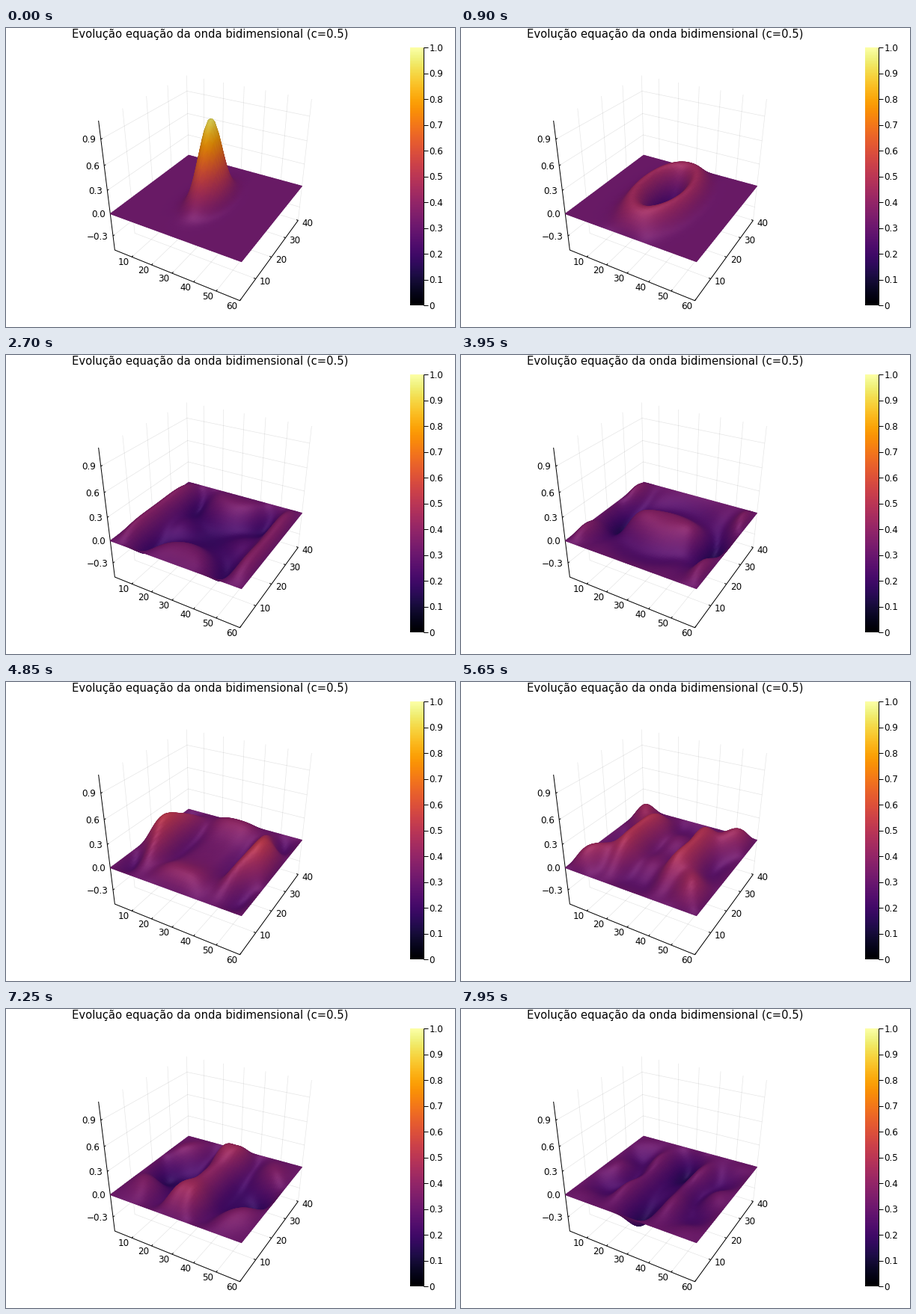
These frames come from a looping animation (600 px wide and 400 px high, 8000 ms). A matplotlib script:

```python
import numpy as np
import matplotlib.pyplot as plt
from matplotlib.animation import FuncAnimation
from matplotlib.collections import LineCollection, TriMesh
from matplotlib.tri import Triangulation

W, H, DPI = 600, 400, 100
FRAMES, INTERVAL = 160, 50
NX, NY = 60, 40
Z_LO, Z_HI = -0.5, 1.1
PX = 72 / DPI                       # points per pixel
LABEL = 11.85                       # tick label size in pixels

plt.rcParams["font.family"] = "DejaVu Sans"
inferno = plt.get_cmap("inferno")

# Camera looking at the cube [-1, 1]^3
VIEW = np.array([0.4330, -0.75, 0.5])
RIGHT = np.array([0.8660, 0.5, 0.0])
UP = np.array([-0.25, 0.4330, 0.8660])
DIST = np.sqrt(3) / np.sin(np.radians(15))
FOCAL = 172.5 / np.tan(np.radians(15))
CX, CY = 273.3, 198.8


def project(x, y, z):
    p = np.stack(np.broadcast_arrays(x, y, z), axis=-1).astype(float)
    scale = FOCAL / (DIST - p @ VIEW)
    return CX + scale * (p @ RIGHT), CY - scale * (p @ UP)


def to_box(value, lo, hi):
    return 2 * (value - lo) / (hi - lo) - 1


# Wave on a 2:1 membrane with fixed edges, as a sum of standing waves
SIGMA = 0.12
STEP = 0.0158                       # distance travelled per frame
RX, RY = STEP * (NX - 1) / 2, STEP * (NY - 1)

gx = np.linspace(-1, 1, NX)
gy = np.linspace(-1, 1, NY)
m = np.arange(1, NX - 1)
n = np.arange(1, NY - 1)
sin_x = np.sin(np.pi * np.outer(m, np.arange(NX)) / (NX - 1))
sin_y = np.sin(np.pi * np.outer(n, np.arange(NY)) / (NY - 1))
amp_x = 2 / (NX - 1) * sin_x @ np.exp(-gx**2 / (2 * SIGMA**2))
amp_y = 2 / (NY - 1) * sin_y @ np.exp(-(gy / 2)**2 / (2 * SIGMA**2))
amp = np.outer(amp_x, amp_y)
omega = 2 * np.arcsin(np.sqrt(
    (RX * np.sin(np.pi * m / (2 * (NX - 1))))[:, None]**2
    + (RY * np.sin(np.pi * n / (2 * (NY - 1))))[None, :]**2))


def wave(k):
    return sin_x.T @ (amp * np.cos(omega * k)) @ sin_y


# Light halfway between the vertical and the viewer
HALF = VIEW + np.array([0, 0, 1])
HALF /= np.linalg.norm(HALF)


def shade(u, z):
    dzx, dzy = np.gradient(z, gx, gy)
    lit = (HALF[2] - dzx * HALF[0] - dzy * HALF[1]) / np.sqrt(1 + dzx**2 + dzy**2)
    lit = np.clip(lit, 0, 1)[..., None]
    rgba = inferno((u - Z_LO) / (Z_HI - Z_LO))
    rgba[..., :3] = np.clip(rgba[..., :3] * (0.72 + 0.2 * lit) + 0.09 * lit**14, 0, 1)
    return rgba.reshape(-1, 4)


fig = plt.figure(figsize=(W / DPI, H / DPI), dpi=DPI, facecolor="white")
ax = fig.add_axes([0, 0, 1, 1])
ax.axis("off")


def label(x, y, s, ha, size=LABEL):
    """Text whose digits are centred vertically on y."""
    ax.text(x, y + 0.365 * size, s, ha=ha, va="baseline", fontsize=size * PX)


def lines(paths, width, zorder, alpha=1.0):
    ax.add_collection(LineCollection(paths, colors=[(0, 0, 0, alpha)],
                                     linewidths=width * PX, zorder=zorder))


def path(*points):
    return np.column_stack(project(*np.array(points, float).T))


# Axes, ticks and back-wall grid
TICK = 0.03
grid, ticks = [], []

for v in range(10, 61, 10):
    b = to_box(v, 1, NX)
    grid.append(path((b, -1, -1), (b, 1, -1), (b, 1, 1)))
    ticks.append(path((b, -1, -1), (b, -1 + TICK, -1)))
    x, y = ticks[-1][0]
    label(x - 11.2, y + 6.8, str(v), "center")

for v in range(10, 41, 10):
    b = to_box(v, 1, NY)
    grid.append(path((1, b, -1), (-1, b, -1), (-1, b, 1)))
    ticks.append(path((1, b, -1), (1 - TICK, b, -1)))
    x, y = ticks[-1][0]
    label(x + 12.5, y + 3.5, str(v), "center")

for v in (-0.3, 0.0, 0.3, 0.6, 0.9):
    b = to_box(v, Z_LO, Z_HI)
    grid.append(path((-1, -1, b), (-1, 1, b), (1, 1, b)))
    ticks.append(path((-1, -1, b), (-1, -1 + TICK, b)))
    x, y = ticks[-1][0]
    label(x - 6.2, y + 0.2, f"{v:.1f}".replace("-", "\u2212"), "right")

frame_axes = path((-1, -1, 1), (-1, -1, -1), (1, -1, -1), (1, 1, -1))
lines(grid, 0.7, 1, alpha=0.1)
lines([frame_axes] + ticks, 1, 2)

# Colour bar
BAR_L, BAR_R, BAR_T, BAR_B = 540, 558, 26, 371
ax.imshow(np.linspace(1, 0, 345)[:, None], cmap=inferno, aspect="auto",
          extent=(BAR_L, BAR_R, BAR_B, BAR_T), interpolation="nearest")
bar = [[(BAR_R, BAR_T), (BAR_R, BAR_B)]]
for i in range(11):
    y = BAR_B + (BAR_T - BAR_B) * i / 10
    bar.append([(BAR_R, y), (BAR_R + 6, y)])
    label(565.2, y + 0.2, f"{i / 10:.1f}" if i else "0", "left")
lines(bar, 1, 3)

label(273, 7.7, "Evolução equação da onda bidimensional (c=0.5)", "center", 14.75)

# Surface triangles ordered from the far corner to the near one
jj, ii = np.meshgrid(np.arange(NY - 2, -1, -1), np.arange(NX - 1), indexing="ij")
a = (ii * NY + jj).ravel()
b, c, d = a + NY, a + 1, a + NY + 1
cells = np.stack([c, a, d, a, b, d], axis=1).reshape(-1, 3)

px, py = project(gx[:, None], gy[None, :], np.zeros((NX, NY)))
tri = Triangulation(px.ravel().copy(), py.ravel().copy(), cells)
mesh = TriMesh(tri, zorder=4)
ax.add_collection(mesh, autolim=False)

ax.set_xlim(0, W)
ax.set_ylim(H, 0)


def update(k):
    u = wave(k)
    z = to_box(u, Z_LO, Z_HI)
    px, py = project(gx[:, None], gy[None, :], z)
    tri.x[:] = px.ravel()
    tri.y[:] = py.ravel()
    mesh.set_facecolor(shade(u, z))
    return [mesh]


anim = FuncAnimation(fig, update, frames=FRAMES, interval=INTERVAL,
                     init_func=lambda: update(0), repeat=True, repeat_delay=0)
plt.show()
```
